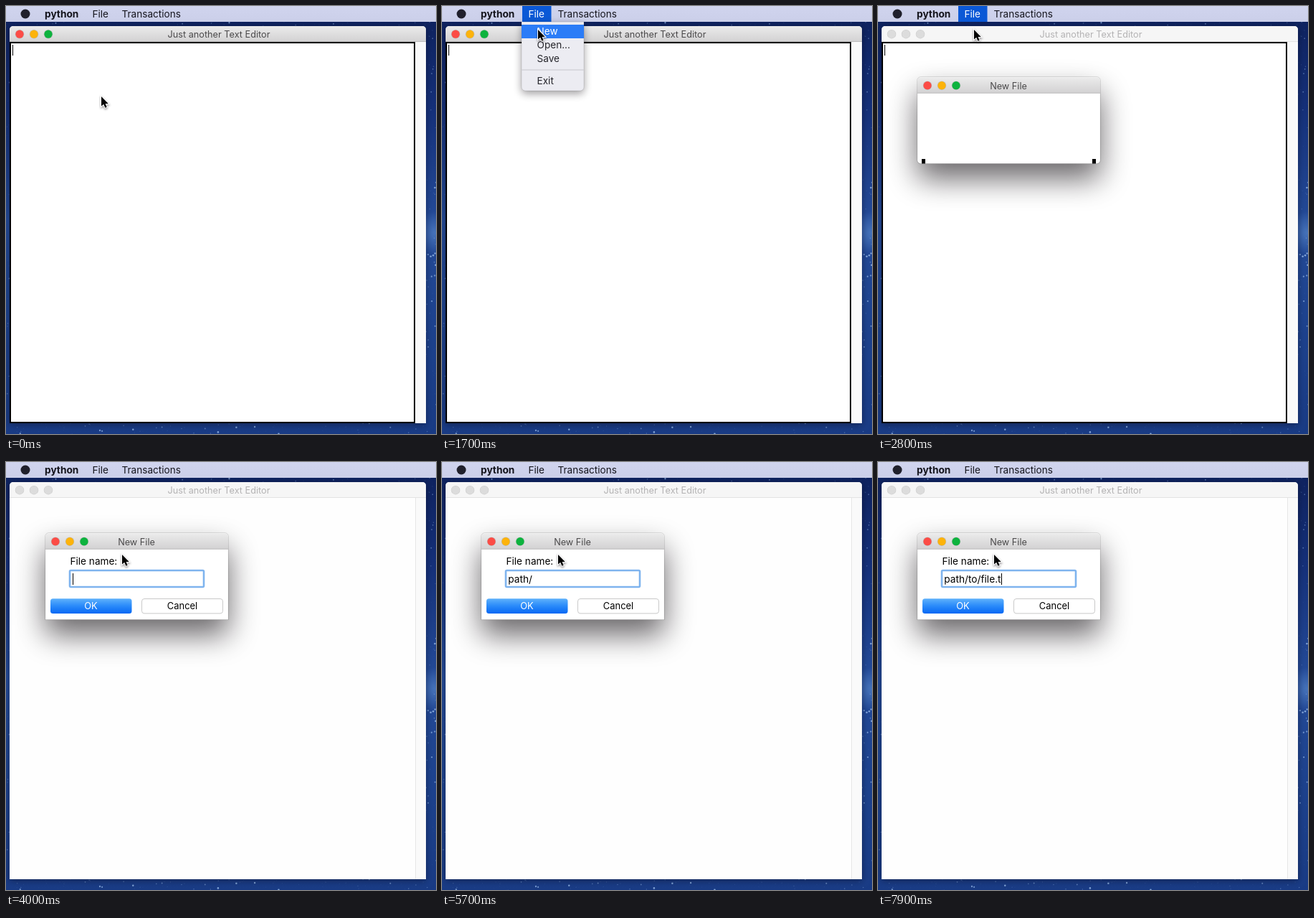
Animation of 600x596 px, one loop 8000 ms. Source, as an HTML page with a canvas:

```html
<!DOCTYPE html>
<html lang="en">
<head>
<meta charset="utf-8">
<title>Text editor: new file</title>
<style>
  html, body { margin: 0; width: 100%; height: 100%; overflow: hidden; background: #14306f; }
  canvas { display: block; }
</style>
</head>
<body>
<canvas id="stage" width="600" height="596"></canvas>
<script>
const canvas = document.getElementById('stage');
let ctx = canvas.getContext('2d');
const LOOP = 8000, STEP = 100;
const MENU_OPEN = 1000, MENU_CLOSE = 2000, DIALOG_OPEN = 2800, DIALOG_READY = 2900;

// Cursor tip: time, x, y
const cursorPath = [
  [0, 133, 126], [300, 133, 126], [900, 129, 10], [1200, 129, 10],
  [1600, 134, 33], [2900, 134, 33], [3500, 162, 129]
];
const typed = 'path/to/file.t';
const keyTimes = [4400, 4500, 4600, 4700, 4900, 5900, 6100, 6400,
                  7000, 7200, 7300, 7400, 7700, 7900];

function rect(x, y, w, h, fill, radii = 0) {
  ctx.fillStyle = fill;
  ctx.beginPath();
  ctx.roundRect(x, y, w, h, radii);
  ctx.fill();
}

function frame(x, y, w, h, color, width, radius = 0) {
  ctx.strokeStyle = color;
  ctx.lineWidth = width;
  ctx.beginPath();
  ctx.roundRect(x, y, w, h, radius);
  ctx.stroke();
}

function dot(x, y, r, fill) {
  ctx.fillStyle = fill;
  ctx.beginPath();
  ctx.arc(x, y, r, 0, 7);
  ctx.fill();
}

function text(str, x, y, size, color, align = 'left', weight = 400) {
  ctx.font = `${weight} ${size}px Inter, "Open Sans", sans-serif`;
  ctx.textAlign = align;
  ctx.fillStyle = color;
  ctx.fillText(str, x, y);
}

function vertical(y0, y1, ...colors) {
  const g = ctx.createLinearGradient(0, y0, 0, y1);
  colors.forEach((c, i) => g.addColorStop(i / (colors.length - 1), c));
  return g;
}

function withShadow(blur, dy, alpha, draw) {
  ctx.save();
  ctx.shadowColor = `rgba(10,5,10,${alpha})`;
  ctx.shadowBlur = blur;
  ctx.shadowOffsetY = dy;
  draw();
  ctx.restore();
}

function drawSky() {
  rect(0, 0, 600, 596, vertical(0, 596, '#0c1f5a', '#14307a', '#234a98', '#1c418d', '#183a84'));
  const glow = ctx.createRadialGradient(600, 316, 0, 600, 316, 30);
  glow.addColorStop(0, 'rgba(100,150,215,.55)');
  glow.addColorStop(1, 'rgba(100,150,215,0)');
  rect(560, 280, 40, 70, glow);
  let seed = 11;
  const rnd = () => (seed = seed * 16807 % 2147483647) / 2147483647;
  for (let i = 0; i < 3200; i++) {
    const x = rnd() * 600, y = rnd() * 596, light = rnd() ** 4;
    dot(x, y, 0.5 + light * 0.8, `rgba(160,195,240,${0.1 + light * 0.7})`);
  }
}

function drawLights(x, y, active) {
  ['#fc4c46', '#fdb30a', '#0db33e'].forEach((c, i) => {
    dot(x + i * 20, y, 6.2, active ? 'rgba(0,0,0,.16)' : '#cfcfcf');
    dot(x + i * 20, y, 5.6, active ? c : '#dcdcdc');
  });
}

function drawTitleBar(x, y, w, title, center, active) {
  rect(x, y, w, 22, active ? vertical(y, y + 22, '#ebebeb', '#d2d1d2') : '#f6f6f6', [5, 5, 0, 0]);
  rect(x, y + 21.2, w, 0.8, active ? '#b5b4b5' : '#dcdcdc');
  drawLights(x + 14, y + 11.2, active);
  text(title, center, y + 16, 12.7, active ? '#4b4a4b' : '#b4b3b4', 'center');
}

function drawEditor(t) {
  const active = t < DIALOG_OPEN;
  withShadow(10, 2, 0.4, () => rect(5, 28, 581, 553, '#fff', [5, 5, 0, 0]));
  drawTitleBar(5, 28, 581, 'Just another Text Editor', 297, active);
  if (t < DIALOG_READY) {
    rect(571, 50, 15, 531, '#fafafa');
    frame(6, 51, 564, 529, '#000', 2);
    rect(9, 54, 1, 15, '#000');
  } else {
    rect(5, 50, 566, 531, '#fefefe');
    rect(571, 50, 15, 531, '#fafafa');
    rect(571, 50, 1, 531, '#e6e6e6');
  }
}

function drawMenuBar(t) {
  rect(0, 0, 600, 22, vertical(0, 22, '#d0d4ee', '#cbcfe9'));
  dot(27, 11, 6.5, '#20202c');
  const open = t >= MENU_OPEN && t < DIALOG_READY;
  if (open) rect(112, 0, 40.5, 22, '#0a58d6');
  text('python', 54, 16, 13.7, '#15151d', 'left', 700);
  text('File', 120.5, 16, 13.6, open ? '#fff' : '#15151d');
  text('Transactions', 161.5, 16, 13.6, '#15151d');
}

function drawFileMenu(t, cursorY) {
  if (t < MENU_OPEN || t >= MENU_CLOSE + 200) return;
  ctx.save();
  ctx.globalAlpha = t < MENU_CLOSE ? 1 : 1 - (t - MENU_CLOSE + STEP) / 300;
  withShadow(12, 4, 0.4, () => rect(111, 22, 87, 96, '#ececf2', [0, 0, 5, 5]));
  frame(111, 22, 87, 96, 'rgba(0,0,0,.14)', 0.8, [0, 0, 5, 5]);
  const hover = cursorY >= 26;
  if (hover) rect(111, 26, 87, 19, '#2b7cf7');
  [['New', 39.5], ['Open...', 58.7], ['Save', 77.5], ['Exit', 108.5]].forEach(([label, y], i) =>
    text(label, 132.5, y, 13.6, hover && i === 0 ? '#fff' : '#25252b'));
  rect(111, 88.2, 87, 1.6, '#d3d3d9');
  ctx.restore();
}

function drawDialog(t) {
  if (t < DIALOG_OPEN) return;
  const ready = t >= DIALOG_READY, base = ready ? 0 : 5;
  const shape = [5, 5, base, base];
  withShadow(42, 21, 0.61, () => rect(55, 99, 255, 120.5, '#fff', shape));
  frame(54.7, 98.7, 255.6, 121, 'rgba(0,0,0,.2)', 0.7, shape);
  drawTitleBar(55, 99.5, 255, 'New File', 182, true);
  if (!ready) {
    rect(61, 213, 5, 6.5, '#000');
    rect(299, 213, 5, 6.5, '#000');
    return;
  }
  text('File name:', 89.5, 143, 13.6, '#000');
  frame(89, 151, 187, 23, '#7fb4ee', 2.6, 1.5);
  drawEntry(t);

  rect(62, 190.3, 113.5, 20.8, vertical(190, 211, '#5fb2fb', '#2a8afa', '#0768f4'), 3.5);
  text('OK', 118.5, 204.6, 12.9, '#fff', 'center');
  rect(189.5, 190.5, 113, 20.4, '#fff', 3.5);
  frame(189.5, 190.5, 113, 20.4, '#c3c3c3', 0.9, 3.5);
  text('Cancel', 246, 204.6, 12.9, '#000', 'center');
}

function drawEntry(t) {
  const count = keyTimes.filter(k => k <= t).length;
  const str = typed.slice(0, count);
  text(str, 92.3, 167.5, 13.7, '#000');
  // The caret restarts its 600 on / 300 off blink with each key
  const since = t - (count ? keyTimes[count - 1] : DIALOG_READY);
  if (since % 900 < 600) rect(Math.round(92.5 + ctx.measureText(str).width), 155, 1, 16, '#000');
}

function cursorAt(t) {
  const i = cursorPath.findIndex(p => p[0] > t);
  if (i < 0) return cursorPath.at(-1).slice(1);
  const [t0, x0, y0] = cursorPath[i - 1], [t1, x1, y1] = cursorPath[i];
  const u = (t - t0) / (t1 - t0), e = u * u * (3 - 2 * u);
  return [x0 + (x1 - x0) * e, y0 + (y1 - y0) * e];
}

function drawCursor(x, y) {
  const arrow = new Path2D('M0 0V13.6L3.2 10.8L5.4 15.8L7.7 14.8L5.6 9.9H9.8Z');
  ctx.save();
  ctx.translate(x, y);
  ctx.strokeStyle = '#fff';
  ctx.lineWidth = 2;
  withShadow(3, 1.5, 0.45, () => ctx.stroke(arrow));
  ctx.fillStyle = '#000';
  ctx.fill(arrow);
  ctx.restore();
}

// The sky never changes, so it is painted once
function paintSky() {
  const sky = new OffscreenCanvas(600, 596), main = ctx;
  ctx = sky.getContext('2d');
  drawSky();
  ctx = main;
  return sky;
}

const sky = paintSky();
const start = performance.now();

function tick() {
  const t = Math.floor((performance.now() - start) % LOOP / STEP) * STEP;
  const [x, y] = cursorAt(t);
  ctx.drawImage(sky, 0, 0);
  drawEditor(t);
  drawMenuBar(t);
  drawFileMenu(t, y);
  drawDialog(t);
  drawCursor(x, y);
  requestAnimationFrame(tick);
}
tick();
</script>
</body>
</html>
```
